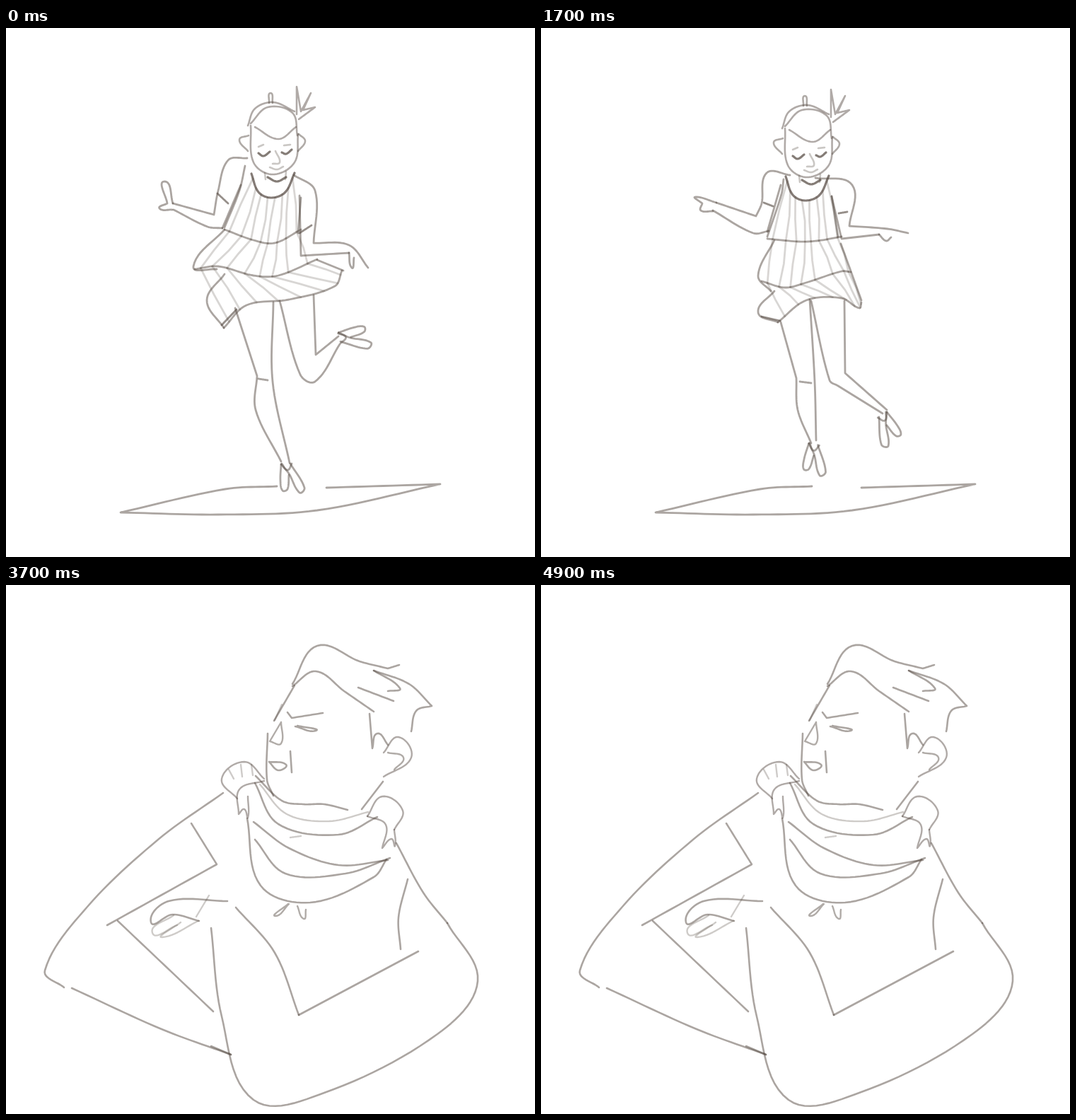
An HTML page with a canvas for the animation above (5000 ms loop, 748x748 px).

```html
<!DOCTYPE html>
<html>
<head>
<meta charset="utf-8">
<style>
html, body { margin: 0; height: 100%; overflow: hidden; background: #fff; }
canvas { display: block; }
</style>
</head>
<body>
<canvas id="stage" width="748" height="748"></canvas>
<script>
const ctx = document.getElementById('stage').getContext('2d');
const mix = (a, b, t) => a + (b - a) * t;
const at = (line, u) => line[Math.round(u * (line.length - 1))];

// "x,y x,y* ..." becomes a smooth polyline; * marks a corner.
function curve(text) {
  const p = text.trim().split(/\s+/).flatMap(s => {
    const q = s.split(',').map(parseFloat);
    return s.endsWith('*') ? [q, q] : [q];
  });
  const dir = i => {
    const a = p[Math.max(i - 1, 0)], b = p[Math.min(i + 1, p.length - 1)];
    const d = Math.hypot(b[0] - a[0], b[1] - a[1]) || 1;
    return [(b[0] - a[0]) / d, (b[1] - a[1]) / d];
  };
  const out = [p[0]];
  for (let i = 0; i < p.length - 1; i++) {
    const a = p[i], b = p[i + 1], da = dir(i), db = dir(i + 1);
    const r = Math.hypot(b[0] - a[0], b[1] - a[1]) / 3;
    for (let k = 1; k <= 12; k++) {
      const t = k / 12, s = 1 - t;
      out.push([0, 1].map(j => s ** 3 * a[j] + 3 * s * s * t * (a[j] + da[j] * r)
        + 3 * s * t * t * (b[j] - db[j] * r) + t ** 3 * b[j]));
    }
  }
  return out;
}
const strokes = text => text.split(';').map(curve);

const blend = (A, B, t) => t ? A.map((a, i) => Array.from({ length: 121 }, (_, k) => {
  const p = at(a, k / 120), q = at(B[i], k / 120);
  return [mix(p[0], q[0], t), mix(p[1], q[1], t)];
})) : A;

const stay = (x, y) => [x, y];
const shift = (dx, dy) => (x, y) => [x + dx, y + dy];

function draw(lines, alpha, width = 2.8, warp = stay) {
  ctx.strokeStyle = `rgba(80,68,60,${alpha})`;
  ctx.lineWidth = width;
  for (const line of lines) {
    ctx.beginPath();
    for (const [x, y] of line) ctx.lineTo(...warp(x, y));
    ctx.stroke();
  }
}

// Dancer: one head and one shoe, three body poses
const floor = strokes('383,648 310,652 162,685* 300,688 440,682 614,645* 453,650');
const hair = strokes(`342,138 352,114 378,105 408,118; 346,135 370,112 405,120 412,152;
  372,106 374,92 377,106; 411,122 411,83* 417,118* 431,92* 420,116* 437,112* 414,129;
  346,138 350,190 377,207 408,190 413,150; 410,140 385,157 352,140;
  343,152 330,158 342,174; 414,150 423,160 413,174`);
const face = strokes(`357,168 364,165; 393,166 402,165; 381,174 387,190 377,192;
  373,197 383,200 392,196; 366,205 367,214; 396,203 395,214`);
const eyes = strokes(`357,177 364,181 373,175; 390,176 396,178 404,172;
  370,211 383,217 396,211; 347,206 357,232 375,240 395,232 408,205`);
const shoe = strokes('-6,2 5,15 20,42 27,35 7,1; -6,2 -7,25 -4,39 3,37 5,17; -5,1 3,10 9,1');

const pose = (arms, dress, legs, cuffs, place) => ({
  arms: strokes(arms), dress: strokes(dress), legs: strokes(legs), cuffs: strokes(cuffs), place
});
const kick = pose(
  `341,184 314,187 300,230 294,264* 236,248; 306,283 285,281 237,257; 332,222 306,283;
  236,248 224,217 228,248* 217,255 235,257; 407,208 437,230 435,304* 485,307 512,339;
  415,237 417,322* 485,318; 485,318 489,339 492,325`,
  `309,285 350,300 380,304 417,285; 267,341 300,337 350,350 385,350 440,327;
  308,424 340,392 400,384 465,365 475,343; 338,195 330,230 309,282; 417,240 413,290;
  309,285 265,337 298,341; 309,348 284,385 308,424; 440,328 477,343`,
  `324,396 355,492* 353,540 389,613; 378,388 377,500 401,615; 357,496 370,498;
  387,386 416,490 437,500 472,447; 435,378 438,462* 470,436`,
  '299,234 314,248; 415,290 432,279; 305,420 326,398',
  { dx: 0, dy: 0, sx: 395, sy: 615, sa: 0, fx: 470, fy: 437, fa: -1.85 });
const lower = pose(
  `348,184 316,185 305,235 297,254* 243,236; 311,278 285,270 240,244; 333,225 311,278;
  243,236 225,202 229,235* 222,239 240,244; 404,206 437,234 429,316* 492,324 514,345;
  413,240 411,310* 480,334; 480,334 486,349 492,338`,
  `305,288 345,297 380,301 412,285; 268,342 300,336 350,351 385,349 435,335;
  318,416 345,390 410,384 442,382 477,350; 338,195 335,225 307,285; 413,240 408,288;
  318,292 265,335 297,340; 312,346 299,385 318,416; 434,340 477,350`,
  `331,408 356,502* 347,550 364,612; 381,388 378,497 375,602; 358,505 370,507;
  387,388 424,488 440,497 500,521; 437,388 445,468* 505,513`,
  '308,238 323,250; 411,279 430,278; 322,416 332,400',
  { dx: 2, dy: 1, sx: 370, sy: 609, sa: 0, fx: 503, fy: 521, fa: -.87 });
const hop = pose(
  `352,208 319,205 312,248 304,266* 248,247; 322,287 300,290 243,258; 339,222 320,288;
  248,247 218,239 228,248* 226,258 243,259; 388,212 440,222 436,280* 490,284 519,290;
  411,238 425,298* 478,292; 478,292 488,301 495,296`,
  `320,298 365,302 390,301 425,295; 312,358 345,367 375,360 425,344 438,345;
  335,416 375,385 425,382 450,396 453,388; 343,214 340,235 320,295; 411,238 420,295;
  330,300 307,350 325,372; 330,372 307,402 335,416; 424,305 453,385`,
  `339,416 361,495* 363,540 382,587; 380,384 387,500 389,583; 366,500 382,502;
  382,386 408,498 420,506 483,545; 429,386 430,488* 489,540`,
  '315,247 328,252; 421,262 433,260; 312,408 338,414',
  { dx: -1, dy: 4, sx: 385, sy: 587, sa: .25, fx: 483, fy: 545, fa: -.62 });

const putShoe = (x, y, a, flip) => draw(shoe, .48, 2.8, (u, v) => [
  x + u * flip * Math.cos(a) - v * Math.sin(a), y + u * flip * Math.sin(a) + v * Math.cos(a)]);

function drawDance(phase) {
  const t = phase > 1 ? (phase - 1) / 4 : 0, from = phase ? lower : kick;
  const get = key => blend(from[key], hop[key], t);
  const n = key => mix(from.place[key], hop.place[key], t);
  const dip = 60 * Math.sin(Math.PI * t), head = shift(n('dx'), n('dy'));
  const legs = get('legs'), dress = get('dress');
  draw(floor, .48);
  draw(hair, .45, 2.6, head);
  draw(face, .3, 2.6, head);
  draw(eyes, .7, 3.2, head);
  draw(get('arms'), .48);
  draw(dress, .48);
  draw(legs.slice(0, 3), .48);
  draw(legs.slice(3), .48, 2.8, (x, y) => [x, y + dip * Math.min(1, Math.max(0, (y - 490) / 45))]);
  draw(get('cuffs'), .6);
  putShoe(n('sx'), n('sy'), n('sa'), 1);
  putShoe(n('fx'), n('fy') + dip, n('fa'), -1);
  const edges = [eyes[3].map(p => head(...p)), ...dress];
  for (let tier = 0; tier < 3; tier++) for (let i = 0; i < 8; i++) {
    const p = at(edges[tier], (i + .5) / 8), q = at(edges[tier + 1], (i + .5) / 8);
    draw([[p, [(p[0] + q[0]) / 2 + (i % 2 ? 2 : -1), (p[1] + q[1]) / 2], q]], .22);
  }
}

// Walker
const ring = strokes('287,601 195,608 86,640* 180,652 350,661 530,646 579,626 471,604');
const suit = strokes(`330,163 275,163 263,188 285,218 312,212; 360,168 440,152* 446,163 420,200;
  297,222 289,271* 275,315; 319,203 308,262; 317,212 332,245 296,290 278,320;
  273,316 241,332* 272,326* 274,333 280,320; 348,200 347,282; 302,282 325,277 350,285 382,285;
  390,208 373,243 385,275; 387,210 388,265 378,316; 420,203 397,282 390,318;
  378,318 363,345 372,342* 375,353 385,335* 390,350 390,320; 297,285 292,362;
  398,285 400,315 395,355; 300,361 345,362 378,370 388,352 393,360`);
const bust = strokes(`327,110 323,92 350,63 362,68; 373,72 402,82 396,99; 345,100 372,78 382,110;
  333,150 365,152 383,125; 330,118 330,140; 345,121 355,112* 356,124* 345,121; 342,132 358,132;
  323,196 330,172* 348,180 338,196; 345,168 340,185 350,190; 323,196 350,200 382,170;
  385,127 431,126; 384,133 385,165* 445,152`);
const breeze = strokes(`281,107 300,118 327,120; 272,120 290,128 325,126; 276,123 328,140;
  270,132 280,146 325,142; 270,145 330,162; 430,124 432,150; 387,143 422,142; 387,152 420,148;
  345,105 370,92; 335,108 360,82; 378,82 388,98; 388,203 410,206; 347,157 346,172; 357,157 357,170`);
const frown = strokes('337,117 345,122; 361,124 370,123');
const near = strokes(`292,355 298,445* 303,530 309,564; 336,363 331,445* 332,480 318,562;
  303,445 322,446; 309,566 291,623* 313,605 316,565; 322,563 326,591 319,594`);
const far = strokes(`337,363 352,458* 382,545; 391,358 371,457; 377,455 391,500 391,545;
  357,460 370,458; 380,545 380,584 391,545`);

function drawWalk(phase) {
  const a = (phase - 2) * Math.PI / 3;
  const sway = 7 * (1 - Math.cos(a)), bob = 15 * (1 - Math.cos(2 * a)), lift = 20 * (1 - Math.cos(a));
  const step = k => (x, y) => [x + sway, y + bob + k * lift * (y - 362) / 262];
  draw(ring, .4);
  draw(near, .45, 2.6, step(-1));
  draw(far, .45, 2.6, step(1));
  for (const [part, alpha] of [[suit, .45], [bust, .4], [breeze, .28], [frown, .55]])
    draw(part, alpha, 2.6, step(0));
}

// Man with folded arms: two poses and shared details
const shutHead = strokes(`405,150 432,86 480,94 538,98* 505,109; 415,131 432,124 470,145 514,184;
  407,148 378,195; 533,110 580,135 610,168* 595,172 580,197; 515,105 550,138 545,150;
  510,140 550,155; 516,172 510,236* 533,210 540,222; 406,178 409,188* 454,185;
  417,201 430,206 445,199; 373,210 363,250 385,297; 378,250 394,254 382,264 377,255;
  402,245 401,268; 530,278 505,310`);
const openHead = strokes(`405,140 440,86 500,108 540,118* 556,113; 405,143 438,122 478,150 520,179;
  408,142 379,192; 520,121 570,140 602,171* 580,178 573,207; 520,121 557,146 540,150;
  498,145 548,164; 514,182 518,231* 525,210 540,226; 398,180 404,188* 448,181;
  409,200 438,206 412,199; 370,210 369,275 378,298; 372,250 396,254 385,262 372,250;
  402,235 404,265; 533,278 503,317`);
const shutScarf = strokes(`355,280 400,309 445,309 475,322 515,312; 357,285 405,340 480,344 513,330;
  350,330 405,381 435,378 530,376; 336,343 385,405 470,408 525,387;
  340,340 355,405 415,447 500,425 517,402`);
const openScarf = strokes(`353,270 390,305 420,310 450,310 483,318; 352,280 385,338 470,353 525,328;
  350,335 400,372 470,396 540,389; 352,360 395,408 480,408 543,386;
  341,330 360,425 430,449 520,413 538,388`);
const shutBody = strokes(`299,295 225,345 150,430 61,545 70,565; 70,565 160,615 253,628;
  264,342 296,393* 163,474; 147,478 272,590; 318,440 222,452 202,487 235,468 273,477;
  283,482 297,600 360,733 430,735 590,648 660,565 650,512; 550,372 600,440 650,515;
  318,442 385,540 422,607; 420,626 565,522; 558,512 545,455 569,411; 270,628 309,664`);
const openBody = strokes(`307,294 215,360 115,455 55,545 82,569; 93,570 220,628 318,664;
  262,337 298,395* 143,481; 158,475 293,603; 313,447 230,447 205,477 235,466 273,475;
  290,485 305,610 350,728 450,718 610,635 667,560 624,478; 552,365 590,435 624,478;
  325,456 380,520 414,608; 414,608 583,518; 558,515 555,470 568,416; 290,652 318,664`);
const details = strokes(`537,238 558,216 576,245 537,272; 543,238 565,245 552,262;
  392,195 376,222* 392,225 392,195; 330,303 308,275 340,251 368,275;
  368,278 333,290 332,325* 340,318 345,330 345,300; 514,328 535,300 564,320 552,347;
  514,328 540,340 535,373* 548,360 553,370 552,347; 402,452 384,469 403,452; 415,455 424,473 427,460`);
const hints = strokes(`393,170 383,192; 362,283 400,325 460,335 515,322; 318,262 325,275; 335,255 337,272;
  350,255 352,270; 405,358 420,356; 240,468 210,493 245,482; 250,478 224,499 275,476; 290,440 272,470`);

function drawRest(phase) {
  const t = phase ? (5 - phase) / 4 : .5, k = phase ? 1 : .97;
  const shrink = (x, y) => [360 + (x - 360) * k, 400 + (y - 400) * k];
  const nudge = (x, y) => shrink(x - 3 * t, y - t);
  for (const [a, b] of [[shutHead, openHead], [shutScarf, openScarf], [shutBody, openBody]])
    draw(blend(a, b, t), .48, 2.6, shrink);
  draw(details, .45, 2.4, nudge);
  draw(hints, .28, 2.4, nudge);
}

ctx.lineCap = ctx.lineJoin = 'round';
function tick(now) {
  const n = Math.floor(now % 5000 / 100);
  ctx.clearRect(0, 0, 748, 748);
  [drawDance, drawWalk, drawRest][Math.floor(n / 18)](n % 6);
  requestAnimationFrame(tick);
}
tick(performance.now());
</script>
</body>
</html>
```
